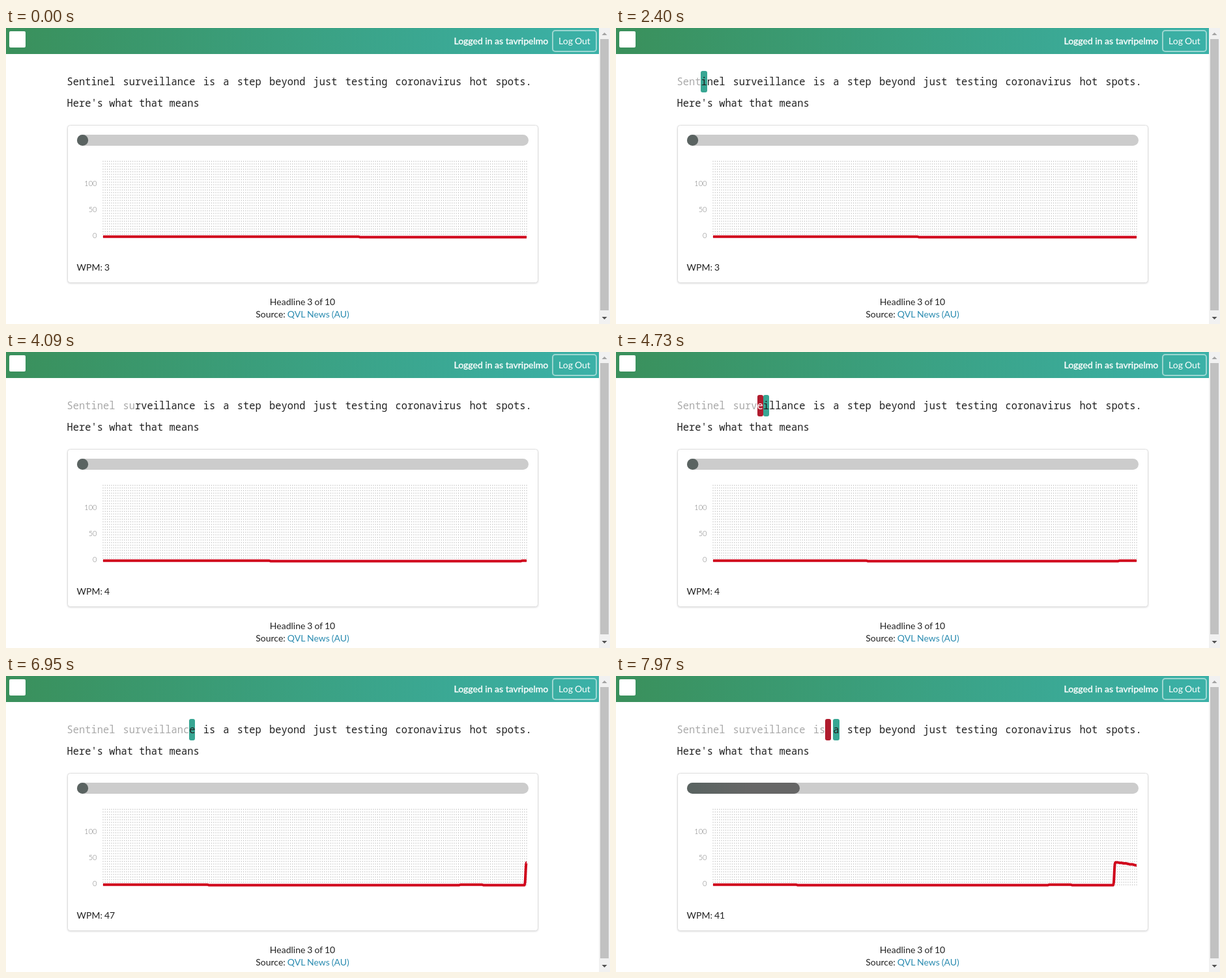
Write an HTML page that moves like this. It is 927 px wide and 455 px high and loops after 8 s.

```html
<!DOCTYPE html>
<html lang="en">
<head>
<meta charset="utf-8">
<title>Typing test</title>
<style>
  html, body { margin: 0; width: 100%; height: 100%; overflow: hidden; background: #fff; }
  svg { display: block; font: 14px Lato, sans-serif; word-spacing: -.6px; fill: #212121; }
  .white { fill: #fff; }
  .user { stroke: #fff; stroke-width: .35px; word-spacing: 0; }
  .mid { text-anchor: middle; }
  .link { fill: #2a8bb0; }
  .axis { font-size: 11px; font-weight: 300; fill: #808080; text-anchor: end; }
  .mono { font: 15.4px "Noto Sans Mono", monospace; word-spacing: 0; }
  .typed { fill: #a9a9a9; }
  .wrong { fill: #fff; }
  .card { fill: #fff; stroke: #dedede; filter: drop-shadow(0 1px 1px rgba(34, 36, 38, .15)); }
  #grid { fill: none; stroke: #ccc; stroke-dasharray: 2 2; }
  #line { fill: none; stroke: #d0021b; stroke-width: 4; stroke-linejoin: round; }
</style>
</head>
<body>
<svg width="927" height="455" viewBox="0 0 927 455">
  <defs>
    <linearGradient id="head"><stop stop-color="#3a905b"/><stop offset="1" stop-color="#3bb1a8"/></linearGradient>
    <linearGradient id="fill" gradientUnits="userSpaceOnUse" x1="117" x2="210" y1="0" y2="0">
      <stop stop-color="#5a6361"/><stop offset="1" stop-color="#666"/>
    </linearGradient>
  </defs>

  <rect width="910" height="40" fill="url(#head)"/>
  <rect class="white" x="5" y="5" width="25" height="25" rx="2"/>
  <text class="white user" x="687.5" y="25">Logged in as tavripelmo</text>
  <rect x="839" y="4" width="67" height="32" rx="4" fill="none" stroke="#fff" stroke-opacity=".5" stroke-width="2"/>
  <text class="white mid" x="872.5" y="25">Log Out</text>

  <rect x="910" width="17" height="455" fill="#f1f1f1"/>
  <rect x="912" y="17" width="13" height="417" fill="#c1c1c1"/>
  <path d="M914.5 11h8l-4-4z" fill="#a3a3a3"/>
  <path d="M914.5 444h8l-4 4z" fill="#505050"/>

  <rect id="miss" y="66" height="33" rx="3" fill="#b01c2e"/>
  <rect id="caret" y="66" height="33" rx="3" fill="#38a693"/>
  <text id="first" class="mono" y="88"></text>
  <text class="mono" x="93.5" y="121">Here's what that means</text>

  <rect class="card" x="94.5" y="149.5" width="722" height="242" rx="4"/>
  <rect x="109" y="164" width="693" height="17" rx="8.5" fill="#ccc"/>
  <rect id="bar" x="109" y="164" height="17" rx="8.5" fill="url(#fill)"/>
  <path id="grid"/>
  <text class="axis" x="139.5" y="243">100</text>
  <text class="axis" x="139.5" y="283">50</text>
  <text class="axis" x="139.5" y="323">0</text>
  <path id="line"/>
  <text id="wpm" x="108.5" y="373"></text>

  <text class="mid" x="455" y="426">Headline 3 of 10</text>
  <text class="mid" x="455" y="445">Source: <tspan class="link">QVL News (AU)</tspan></text>
</svg>
<script>
const LOOP = 8000, TICK = 97.4;
const POINTS = 200, LEFT = 149, STEP = 650 / (POINTS - 1);
const CHAR = 9.236, GAP = 2.98;
const TEXT = 'Sentinel surveillance is a step beyond just testing coronavirus hot spots.';
const KEYS = 'Sentinel survr<eilk<lance isn';  // "<" is backspace
const PACE = [[1800, 0], [2500, 6.2], [3000, 6.2], [4700, 14.3], [5650, 19.6], [7970, 29.4]];  // [ms, keys pressed]
const BLINK = 1060, BLINK_START = 155;
const el = id => document.getElementById(id);

let pen = 93.5;
const chars = [...TEXT].map(c => {
  const span = document.createElementNS('http://www.w3.org/2000/svg', 'tspan'), x = pen;
  span.textContent = c;
  span.setAttribute('x', x);
  el('first').append(span);
  pen += CHAR + (c === ' ' ? GAP : 0);
  return { span, x };
});

const columns = Array.from({ length: POINTS }, (_, i) => LEFT + i * STEP);
el('grid').setAttribute('d', columns.map(x => `M${x} 204V323`).join(''));

function keysAt(t) {
  const i = PACE.findIndex(p => p[0] > t);
  if (i < 1) return i ? KEYS.length : 0;
  const [t0, n0] = PACE[i - 1], [t1, n1] = PACE[i];
  return Math.floor(n0 + (n1 - n0) * (t - t0) / (t1 - t0));
}

// Slow at first, then a jump that sags from 47 to 41
function speed(s) {
  if (s >= 71) return Math.round(47 - 6 * ((s - 71) / 10) ** 1.5);
  return s < -78 || (s >= 40 && s < 51) ? 4 : 3;
}

// The bar trails behind the speed
function barWidth(k) {
  let v = 3;
  for (let s = 0; s < k; s++) v += (speed(s) - v) * .168;
  return Math.max(17.2, v / 150 * 693);
}

function chartPath(k) {
  let px, py;
  return columns.map((x, i) => {
    const y = 324 - .8 * speed(i - POINTS + 1 + k), mid = (px + x) / 2;
    const part = i ? `C${mid} ${py} ${mid} ${y} ${x} ${y}` : `M${x} ${y}`;
    [px, py] = [x, y];
    return part;
  }).join('');
}

function mark(id, i, visible) {
  const x = Math.round(chars[i].x);
  el(id).setAttribute('x', x);
  el(id).setAttribute('width', Math.round(chars[i].x + CHAR) - x);
  el(id).setAttribute('visibility', visible ? 'visible' : 'hidden');
}

function draw(k) {
  const t = k * TICK;
  let typed = '';
  for (const key of KEYS.slice(0, keysAt(t))) typed = key === '<' ? typed.slice(0, -1) : typed + key;
  const pos = typed.length, isWrong = i => i < pos && typed[i] !== TEXT[i];

  chars.forEach((c, i) => c.span.setAttribute('class', isWrong(i) ? 'wrong' : i < pos ? 'typed' : ''));
  mark('caret', pos, (t + BLINK - BLINK_START) % BLINK < BLINK / 2);
  mark('miss', Math.max(0, pos - 1), isWrong(pos - 1));

  el('bar').setAttribute('width', barWidth(k));
  el('line').setAttribute('d', chartPath(k));
  el('wpm').textContent = 'WPM: ' + speed(k);
}

const start = performance.now();
let shown = -1;
function frame() {
  const k = Math.floor((performance.now() - start) % LOOP / TICK);
  if (k !== shown) draw(shown = k);
  requestAnimationFrame(frame);
}
frame();
</script>
</body>
</html>
```
